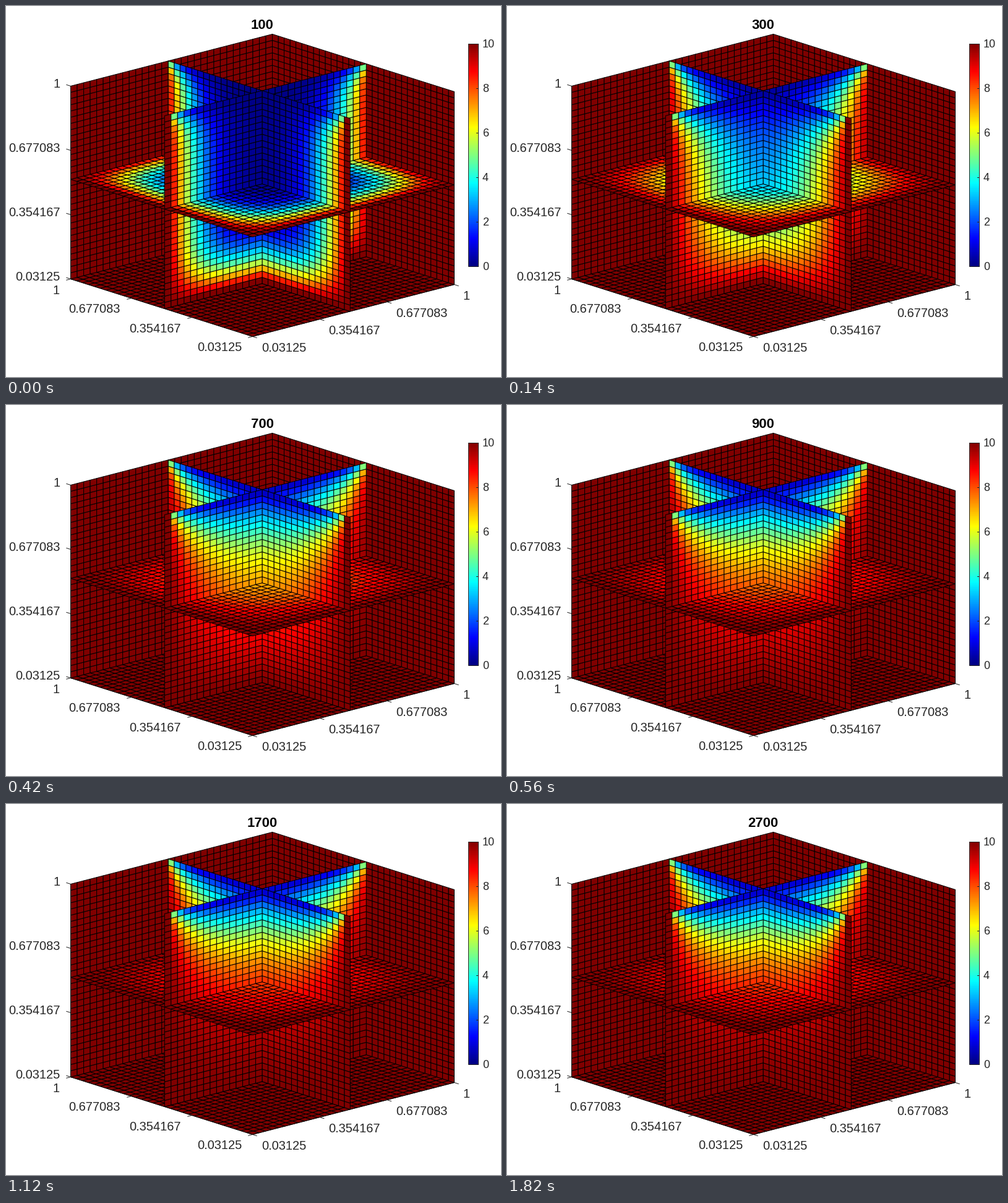
These frames come from a looping animation (800x600 px, 1.89 s). A matplotlib script:

```python
import numpy as np
import matplotlib.pyplot as plt
from matplotlib.animation import FuncAnimation
from matplotlib.collections import LineCollection, PolyCollection
from matplotlib.colors import ListedColormap
from matplotlib.patches import Rectangle

W, H, DPI = 800, 600, 100
PX = 72 / DPI                 # points per pixel
N = 32                        # grid nodes per side
FRAMES, INTERVAL, STEPS = 27, 70, 100
HOT = 10.0
RATE = 1 / 8                  # diffusivity * dt / dx^2
MID_A, MID_B, MID_C = 15, 15, 16
GREY = "#262626"

# Orthographic screen axes of the unit cube
ORIGIN = np.array([398.5, 534.5])
AXIS_A = np.array([326.0, -84.0])
AXIS_B = np.array([-294.0, -93.0])
AXIS_C = np.array([0.0, -312.0])


def project(a, b, c):
    p = np.stack(np.broadcast_arrays(a, b, c), axis=-1) / (N - 1)
    return ORIGIN + p @ np.array([AXIS_A, AXIS_B, AXIS_C])


def jet(m=256):
    i = np.arange(1, m + 1)
    ramp = lambda mid: np.clip(np.minimum(i - mid + 96, mid + 96 - i) / 64, 0, 1)
    return np.column_stack([ramp(192), ramp(128), ramp(64)])


JET = jet()


def colours(values):
    return JET[np.clip((values / HOT * 256).astype(int), 0, 255)]


def plane(axis, level):
    """Lower-corner nodes, outlines and centres of all cells in a grid plane."""
    s, t = (g.ravel() for g in np.meshgrid(np.arange(N - 1), np.arange(N - 1)))
    corners = []
    for ds, dt in ((0, 0), (1, 0), (1, 1), (0, 1)):
        node = [s + ds, t + dt]
        node.insert(axis, np.full_like(s, level))
        corners.append(np.array(node))
    outline = np.stack([project(*n) for n in corners], axis=1)
    return corners[0].T, outline, sum(corners).T / 4


def join(planes):
    return [np.concatenate(part) for part in zip(*planes)]


def build_cells():
    walls = join([plane(2, 0), plane(0, N - 1), plane(1, N - 1)])
    cuts = join([plane(0, MID_A), plane(1, MID_B), plane(2, MID_C)])
    # back to front: large a, large b, small c come first
    side = np.sign(cuts[2] - [MID_A, MID_B, MID_C]) * [-1, -1, 1]
    order = np.lexsort((side[:, 2], side[:, 1], side[:, 0]))
    cuts = [part[order] for part in cuts]
    nodes, outlines, _ = join([walls, cuts])
    return nodes, outlines


def diffuse(u, steps):
    core = u[1:-1, 1:-1, 1:-1]
    for _ in range(steps):
        around = (u[2:, 1:-1, 1:-1] + u[:-2, 1:-1, 1:-1]
                  + u[1:-1, 2:, 1:-1] + u[1:-1, :-2, 1:-1]
                  + u[1:-1, 1:-1, 2:] + u[1:-1, 1:-1, :-2])
        core += RATE * (around - 6 * core)


def solve(nodes):
    """Cube heated on five faces, with a cold lid."""
    u = np.full((N, N, N), HOT)
    u[1:-1, 1:-1, 1:] = 0
    shots = []
    for _ in range(FRAMES):
        diffuse(u, STEPS)
        shots.append(colours(u[tuple(nodes.T)]))
    return shots


fig = plt.figure(figsize=(W / DPI, H / DPI), dpi=DPI, facecolor="white")
ax = fig.add_axes([0, 0, 1, 1])
ax.axis("off")


def label(x, y, text, size=20, ha="left", color=GREY, weight="normal"):
    return ax.text(x, y, text, fontsize=size * PX, ha=ha, va="baseline",
                   color=color, weight=weight, family="Liberation Sans")


def draw_axes():
    unit = lambda v: 7.5 * v / np.hypot(*v)
    out_a, out_b = unit(AXIS_A), unit(AXIS_B)
    left = ORIGIN + AXIS_B
    lines = [(left, left + AXIS_C), (ORIGIN, left), (ORIGIN, ORIGIN + AXIS_A)]
    for k, text in enumerate(("0.03125", "0.354167", "0.677083", "1")):
        pa = ORIGIN + AXIS_A * k / 3
        pb = ORIGIN + AXIS_B * k / 3
        pc = left + AXIS_C * k / 3
        lines += [(pa, pa - out_b), (pb, pb - out_a), (pc, pc + out_b)]
        label(pa[0] + 14.5, pa[1] + 24.5, text)
        label(pb[0] - 17.5, pb[1] + 24, text, ha="right")
        label(pc[0] - 17, pc[1] + 3, text, ha="right")
    ax.add_collection(LineCollection(lines, colors=GREY, linewidths=PX, zorder=1))


def draw_colorbar():
    x0, x1, y0, y1 = 746.5, 762.5, 60.5, 420.5
    ax.pcolormesh([x0, x1], np.linspace(y1, y0, 257), np.arange(256)[:, None],
                  cmap=ListedColormap(JET), antialiased=False)
    ax.add_patch(Rectangle((x0, y0), x1 - x0, y1 - y0, fill=False,
                           ec=GREY, lw=PX, zorder=3))
    for v in range(0, 11, 2):
        y = y1 - (y1 - y0) * v / 10
        ax.plot([x1 - 3, x1], [y, y], color=GREY, lw=PX, zorder=3)
        label(770, y + 6.5, str(v), size=18)


nodes, outlines = build_cells()
shots = solve(nodes)

draw_axes()
draw_colorbar()
cells = PolyCollection(outlines, facecolors=shots[0], edgecolors="black",
                       linewidths=PX, zorder=2)
ax.add_collection(cells)
title = label(414, 37, "", size=22, ha="center", color="black", weight="bold")
ax.set_xlim(0, W)
ax.set_ylim(H, 0)


def update(i):
    cells.set_facecolor(shots[i])
    title.set_text(str(STEPS * (i + 1)))
    return cells, title


anim = FuncAnimation(fig, update, frames=FRAMES, interval=INTERVAL,
                     repeat=True, repeat_delay=0)
plt.show()
```
